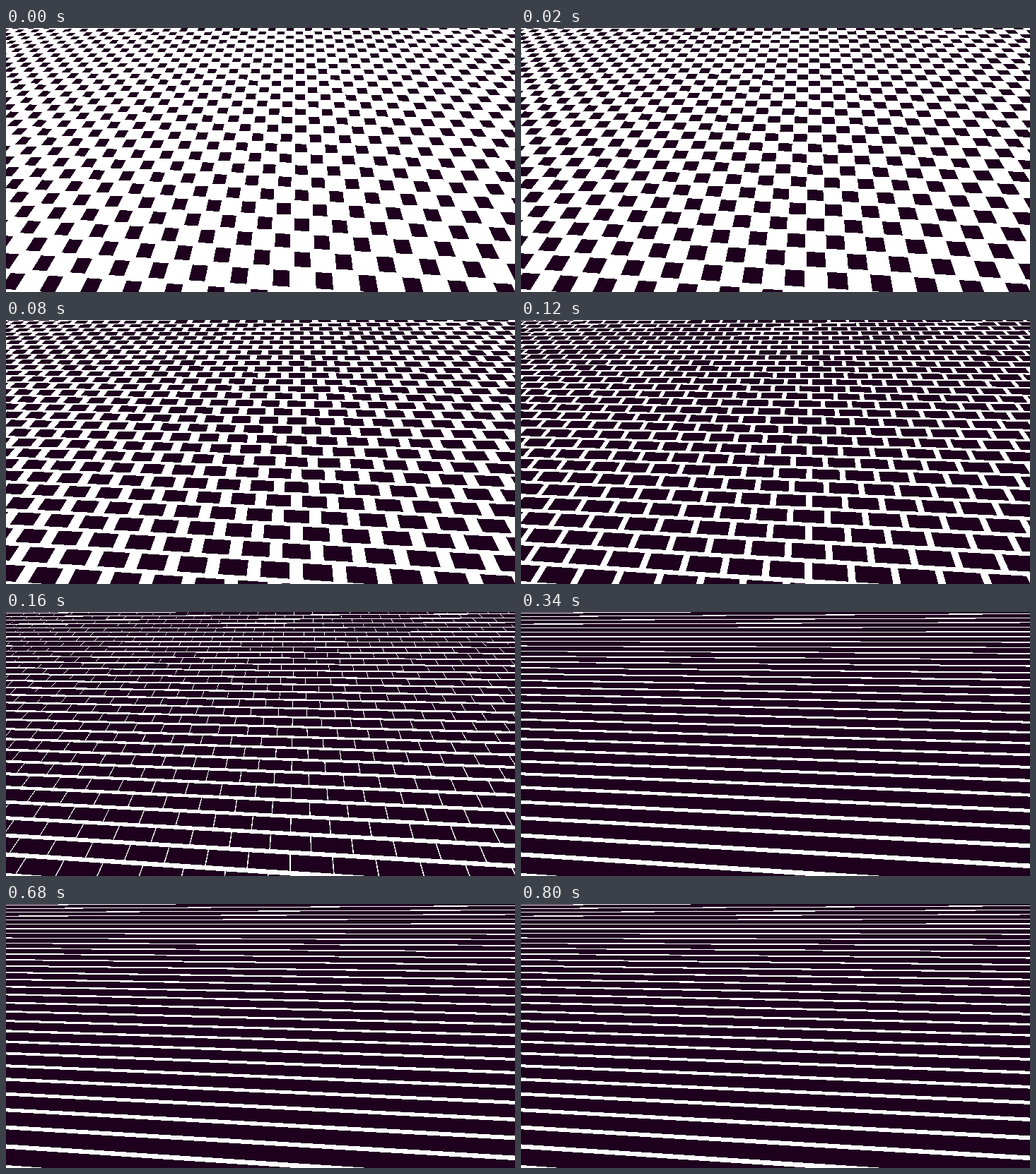
These frames come from a looping animation (720x374 px, 840 ms). An HTML page with a canvas:

```html
<!DOCTYPE html>
<html lang="en">
<head>
<meta charset="utf-8">
<title>Sliding brick plane</title>
<style>
  html, body { margin: 0; width: 100%; height: 100%; overflow: hidden; background: #fff; }
  canvas { display: block; width: 720px; height: 374px; }
</style>
</head>
<body>
<canvas id="stage" width="720" height="374"></canvas>
<script>
const W = 720, H = 374, LOOP = 840, STEP = 20;
const ctx = document.getElementById('stage').getContext('2d');

// Tilted plane: u runs along a row, v counts rows upward.
const origin = { x: 400.9, y: 370 };
const rowVanish = { x: -4700, y: 33 };
const columnVanish = { x: 411.7, y: -265.2 };
const rowScale = -0.01209, columnScale = 0.04848;

const HALF_GAP = 0.11;
const INK = 0xff1e001e, PAPER = 0xffffffff;

const image = ctx.createImageData(W, H);
const pixels = new Uint32Array(image.data.buffer);

// For each pixel: how far it lies left of its brick's fixed right edge.
// 2 marks the white band between two rows.
const reach = new Float32Array(W * H);

function toPlane(x, y) {
  const ax = rowScale * (rowVanish.x - x), ay = rowScale * (rowVanish.y - y);
  const bx = columnScale * (columnVanish.x - x), by = columnScale * (columnVanish.y - y);
  const dx = x - origin.x, dy = y - origin.y;
  const det = ax * by - ay * bx;
  return [(dx * by - dy * bx) / det, (ax * dy - ay * dx) / det];
}

for (let y = 0, i = 0; y < H; y++) {
  for (let x = 0; x < W; x++, i++) {
    const [u, v] = toPlane(x + 0.5, y + 0.5);
    const row = Math.floor(v);
    const across = u - (row & 1) / 2;
    const inBand = Math.abs(v - row - 0.5) > 0.5 - HALF_GAP;
    reach[i] = inBand ? 2 : Math.ceil(across) - across;
  }
}

const brickWidth = time => Math.min(1, 0.39 + 0.00365 * time);

let shownWidth = -1;

function draw(now) {
  const time = Math.floor(now % LOOP / STEP) * STEP;
  const width = brickWidth(time);
  if (width !== shownWidth) {
    shownWidth = width;
    for (let i = 0; i < pixels.length; i++) {
      pixels[i] = reach[i] <= width ? INK : PAPER;
    }
    ctx.putImageData(image, 0, 0);
  }
}

let start;
function tick(now) {
  start ??= now;
  draw(now - start);
  requestAnimationFrame(tick);
}

draw(0);
requestAnimationFrame(tick);
</script>
</body>
</html>
```
